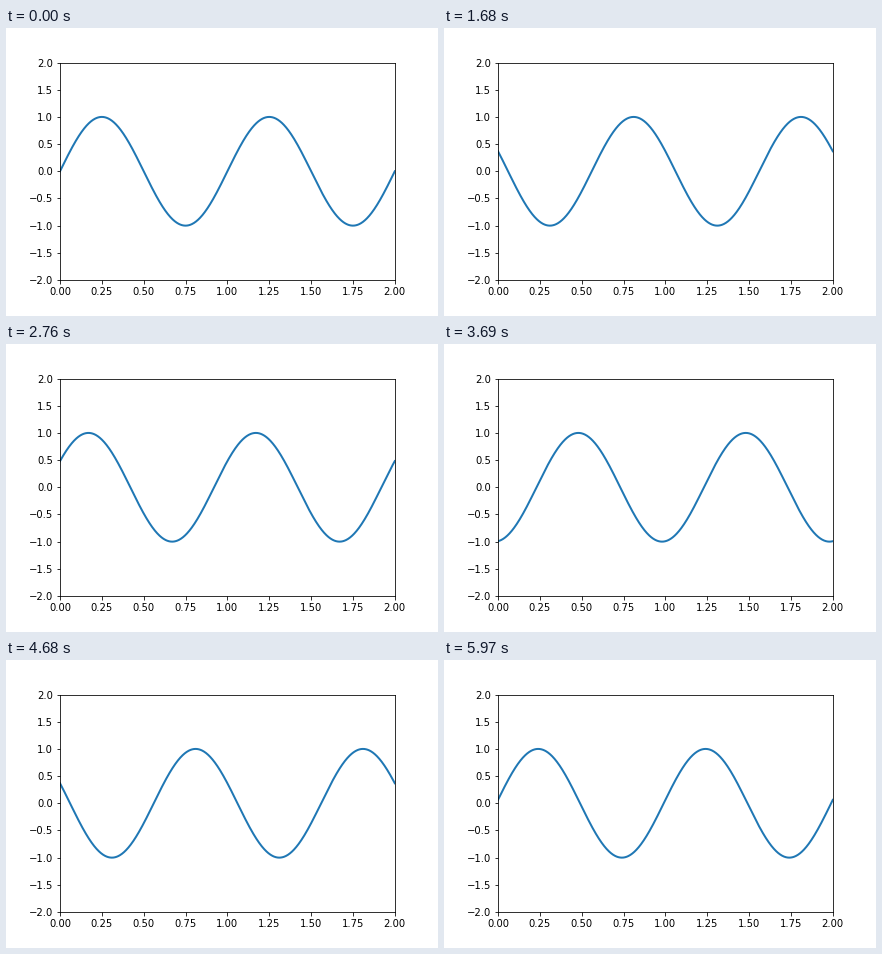
Write a matplotlib script that moves like this. It is 432x288 px and loops after 6 s.

```python
import numpy as np
import matplotlib.pyplot as plt
from matplotlib.animation import FuncAnimation

FRAMES = 200
INTERVAL = 30  # ms
SPEED = 0.01   # shift to the right per frame, in x units

fig = plt.figure(figsize=(6, 4), dpi=72)
fig.subplots_adjust(bottom=0.125)
ax = plt.axes(xlim=(0, 2), ylim=(-2, 2))
line, = ax.plot([], [], lw=2)

x = np.linspace(0, 2, 1000)


def init():
    line.set_data([], [])
    return line,


def update(i):
    line.set_data(x, np.sin(2 * np.pi * (x - SPEED * i)))
    return line,


anim = FuncAnimation(fig, update, init_func=init, frames=FRAMES,
                     interval=INTERVAL, blit=True, repeat=True,
                     repeat_delay=0)

plt.show()
```
